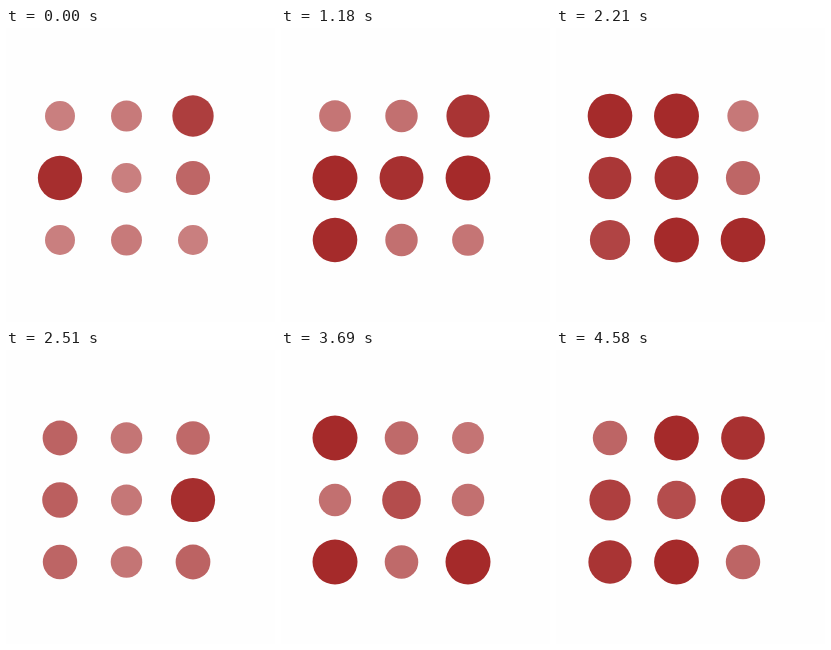
An HTML page for the animation above (4600 ms loop, 269 by 294 pixels).

```html
<!DOCTYPE html>
<html lang="en">
<head>
<meta charset="utf-8">
<title>Pulsing dot grid</title>
<style>
  html, body { margin: 0; width: 100%; height: 100%; overflow: hidden; background: #fefefe; }
  svg { display: block; width: 269px; height: 294px; }
</style>
</head>
<body>
<svg id="stage" viewBox="0 0 269 294" fill="#a52a2a"></svg>
<script>
const LOOP = 4600, STEPS = 32, STEP = 150;
const LEAD = 18000; // the pulses have already run this long when the loop begins
const PERIODS = [1500, 1300, 1700, 1100, 900, 700, 500, 1300, 1500];
const R_MIN = 15, R_MAX = 22.5, A_MIN = 0.6;

const stage = document.getElementById('stage');
const dots = PERIODS.map((period, i) => {
  const el = document.createElementNS('http://www.w3.org/2000/svg', 'circle');
  el.setAttribute('cx', 54 + 66.5 * (i % 3));
  el.setAttribute('cy', 88 + 62 * Math.floor(i / 3));
  stage.appendChild(el);
  return { el, period };
});

const bezier = (a, b, u) => 3 * a * u * (1 - u) ** 2 + 3 * b * u * u * (1 - u) + u ** 3;

// CSS "ease": cubic-bezier(.25, .1, .25, 1)
function ease(x) {
  let lo = 0, hi = 1;
  for (let i = 0; i < 24; i++) {
    const mid = (lo + hi) / 2;
    if (bezier(0.25, 0.25, mid) < x) lo = mid; else hi = mid;
  }
  return bezier(0.1, 1, (lo + hi) / 2);
}

// Grows for half a period, shrinks for the other half
function pulse(t, period) {
  const p = (t % period) / period * 2;
  return p < 1 ? ease(p) : 1 - ease(p - 1);
}

// Steps last 150 ms, now and then 140 ms
const stepStart = i => i ? STEP * i - 10 * Math.max(1, Math.floor(i / 4)) : 0;

function stepAt(t) {
  let i = STEPS - 1;
  while (stepStart(i) > t) i--;
  return i;
}

function draw(ms) {
  const t = LEAD + STEP * stepAt(ms % LOOP);
  for (const { el, period } of dots) {
    const k = pulse(t, period);
    el.setAttribute('r', (R_MIN + (R_MAX - R_MIN) * k).toFixed(3));
    el.setAttribute('fill-opacity', (A_MIN + (1 - A_MIN) * k).toFixed(4));
  }
}

const begin = performance.now();
function tick() {
  draw(performance.now() - begin);
  requestAnimationFrame(tick);
}
draw(0);
requestAnimationFrame(tick);
</script>
</body>
</html>
```
